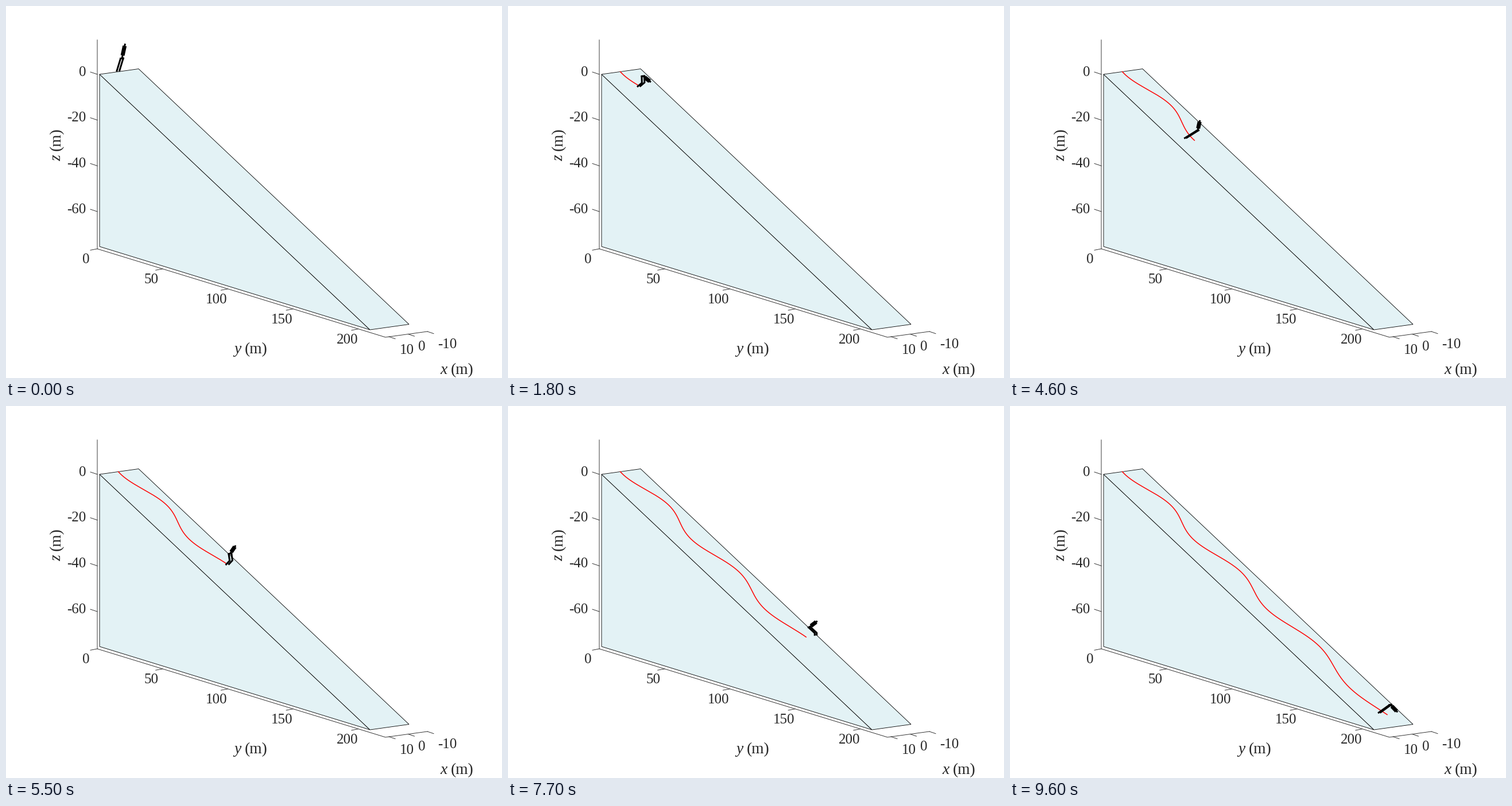
Write a matplotlib script that moves like this. It is 864 by 648 pixels and loops after 9700 ms.

```python
import numpy as np
import matplotlib.pyplot as plt
from matplotlib.animation import FuncAnimation

W, H, DPI = 864, 648, 100
FRAMES, STEP = 97, 100
PX = 72 / DPI
SERIF = "Liberation Serif"
INK = "#262626"
ICE = "#e3f2f5"

# slope corners: top left, its two directions on screen
TOP = np.array([163, 119])
DOWN = np.array([471, 445])
ACROSS = np.array([68, -9.5])

# key poses: time (s), foot offset to the side (px), torso pitch (degrees)
KEYS = np.array([
    (0, -3, -73), (1.8, -4, 33), (3.1, 11, 27), (4.6, -18, -73),
    (5, -1, -68), (6.4, -2, -18), (7, -10, 49), (7.7, 15, -35),
    (8, 12, 20), (9, -26, 27), (9.6, -16, 42),
]).T


def on_slope(down, across):
    return TOP + np.multiply.outer(down, DOWN) + np.multiply.outer(across, ACROSS)


def track_at(t):
    """Accelerating run with turns that get longer further down."""
    s = t * (0.014 + 0.01034 * t - 0.00015 * t**2)
    turns = (s - 0.135) / 0.125 - 1.05 * s**2.5
    return on_slope(s, 0.625 - 0.03 * s + 0.15 * np.cos(np.pi * turns))


def pose(t):
    """Foot, knee, hip and head relative to the track's end, and leg spacing."""
    side, pitch = (np.interp(t, KEYS[0], k) for k in KEYS[1:])
    stand = max(0, 1 - t)
    foot = np.array([side, 3 - 0.35 * abs(side) - 2 * stand])
    hip = np.array([4, -17 - 6 * stand])
    reach = np.hypot(*(hip - foot))
    bend = np.sqrt(max(0, 11.5**2 - (reach / 2)**2))
    knee = (foot + hip) / 2 + bend * np.array([0.8, 0.4])
    a = np.radians(pitch)
    head = hip + (19 + 8 * stand) * np.array([np.cos(a), np.sin(a)])
    return foot, knee, hip, head, 5 - 0.1 * abs(side)


fig = plt.figure(figsize=(W / DPI, H / DPI), dpi=DPI, facecolor="white")
ax = fig.add_axes([0, 0, 1, 1])
ax.set_xlim(0, W)
ax.set_ylim(H, 0)
ax.axis("off")


def line(pts, color=INK, width=0.9, **kw):
    return ax.plot(*zip(*pts), color=color, lw=width * PX, **kw)[0]


def text(x, y, s, size=25, **kw):
    ax.text(x, y, s, family=SERIF, fontsize=size * PX, color=INK,
            va="baseline", rotation_mode="anchor", **kw)


def axis_name(x, y, letter, advance, angle=0):
    size = 27.5
    text(x, y, letter, size, style="italic", rotation=angle)
    step = advance * size
    x, y = (x, y - step) if angle else (x + step, y)
    text(x, y, "(m)", size, rotation=angle)


def number(x, mid, value, ha="center"):
    text(x, mid + 8.5, str(value), ha=ha)


# axes and ticks
line([(159, 59), (159, 423), (661, 577), (734, 567)])
for i in range(4):
    y = 119 + 79.7 * i
    line([(147, y - 4), (159, y)])
    number(139, 113 + 79.9 * i, -20 * i, "right")
for i in range(5):
    x, y = 159 + 113.7 * i, 423 + 34.9 * i
    line([(x - 12, y + 2.3), (x, y)])
    number(139 + 113.8 * i, 439 + 35.2 * i, 50 * i)
for i, x in enumerate((698, 724, 769)):
    tx, ty = 667 + 33.5 * i, 576 - 4.5 * i
    line([(tx, ty), (tx + 11, ty + 3.7)])
    number(x, 597 - 5 * i, 10 - 10 * i)

axis_name(397, 605, "y", 0.694)
axis_name(756, 641, "x", 0.694)
axis_name(95, 270, "z", 0.639, 90)

# slope
for pts in ([TOP, TOP + (0, 300), TOP + DOWN],
            [TOP, TOP + ACROSS, TOP + DOWN + ACROSS, TOP + DOWN]):
    ax.fill(*zip(*pts), facecolor=ICE, edgecolor="black", lw=0.85 * PX, zorder=3)


def limb(width, **kw):
    return line([(0, 0)], "black", width, zorder=5, **kw)


track = line([(0, 0)], "red", 1.5, zorder=4)
legs = [limb(3, solid_capstyle="butt", solid_joinstyle="round") for _ in range(2)]
hips = limb(3)
spine = limb(3, solid_capstyle="butt")
torso = limb(7, solid_capstyle="butt")


def draw(frame):
    t = frame * STEP / 1000
    path = track_at(np.linspace(0, t, 5 * frame + 1))
    track.set_data(*path.T)

    *joints, gap = pose(t)
    foot, knee, hip, head = path[-1] + np.array(joints)
    shift = np.array([gap, -0.5])
    for k, leg in enumerate(legs):
        leg.set_data(*(np.array([foot, knee, hip]) + k * shift).T)
    hips.set_data(*np.array([hip, hip + shift]).T)
    base = hip + shift / 2
    spine.set_data(*np.array([base, head]).T)
    torso.set_data(*np.array([base + f * (head - base) for f in (0.2, 0.85)]).T)
    return [track, *legs, hips, spine, torso]


anim = FuncAnimation(fig, draw, frames=FRAMES, interval=STEP,
                     repeat=True, repeat_delay=0, blit=False)
plt.show()
```
